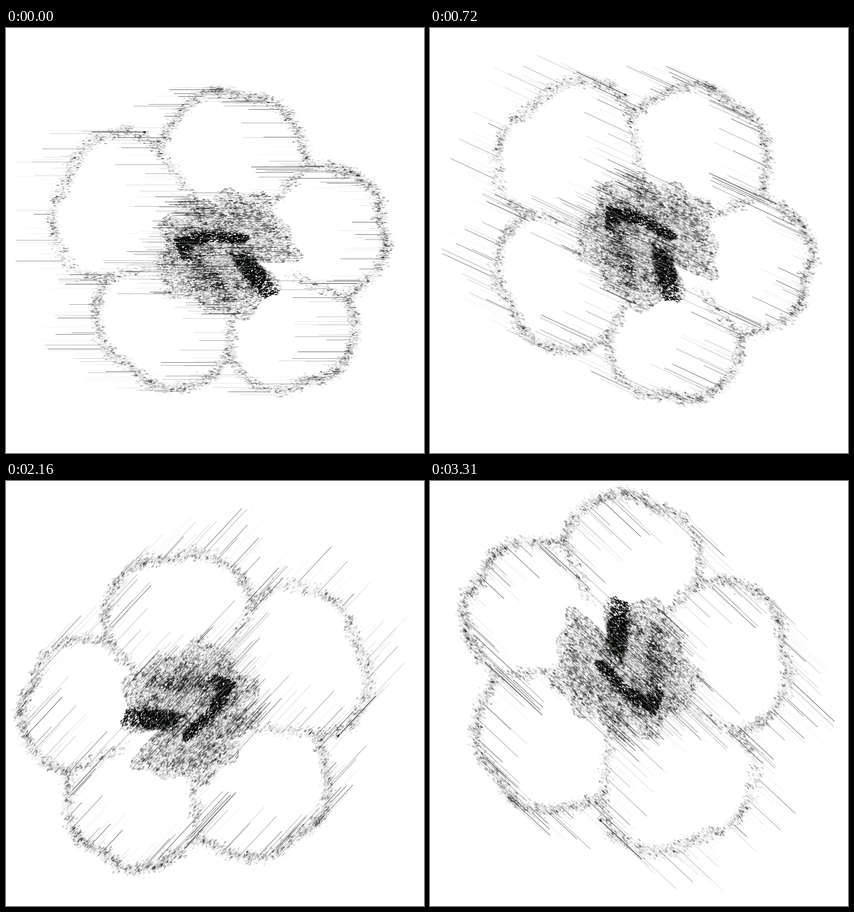
Animation, 742 px wide and 754 px high, one loop 3600 ms. Source, as an HTML page with a canvas:

```html
<!DOCTYPE html>
<html lang="en">
<head>
<meta charset="utf-8">
<title>Streaked flower</title>
<style>
  html, body { margin: 0; width: 100%; height: 100%; overflow: hidden; background: #fff; }
  canvas { display: block; }
</style>
</head>
<body>
<canvas id="stage" width="742" height="754"></canvas>
<script>
const ctx = document.getElementById('stage').getContext('2d');
const HOLD = 720;
const INK = '#080b08';
const LEFT_LIMIT = 17;
const PIVOT = { x: 396, y: 390 };
const HEART = { x: 390, y: 397 };

// Where the pivot lands, the turn in degrees and the scale of each step.
const POSES = [
  { x: 396, y: 390, turn: 0, scale: 1 },
  { x: 397, y: 373, turn: 25, scale: 1.02 },
  { x: 384, y: 425, turn: 95, scale: 1.04 },
  { x: 327, y: 421, turn: 133, scale: 1.04 },
  { x: 335, y: 332, turn: 223, scale: 1.07 }
];

// Points where neighbouring petals meet; bulge shapes the petal that follows.
const JOINTS = [
  { x: 268, y: 215, bulge: -0.07 },
  { x: 532, y: 244, bulge: -0.08 },
  { x: 600, y: 478, bulge: 0.08 },
  { x: 396, y: 570, bulge: 0.07 },
  { x: 185, y: 441, bulge: 0.22 }
];

// Dark strokes in the heart.
const STROKES = [
  { x1: 310, y1: 381, x2: 350, y2: 371, width: 11, dark: 1.5 },
  { x1: 318, y1: 385, x2: 318, y2: 398, width: 11, dark: 1.5 },
  { x1: 350, y1: 370, x2: 420, y2: 372, width: 8, dark: 1.4 },
  { x1: 422, y1: 412, x2: 466, y2: 470, width: 15, dark: 1.2 },
  { x1: 335, y1: 410, x2: 376, y2: 456, width: 14, dark: 0.4 }
];

let seed = 20417;
function rnd() {
  seed = (seed + 0x6D2B79F5) | 0;
  let t = Math.imul(seed ^ (seed >>> 15), 1 | seed);
  t = (t + Math.imul(t ^ (t >>> 7), 61 | t)) ^ t;
  return ((t ^ (t >>> 14)) >>> 0) / 4294967296;
}
const bell = () => rnd() + rnd() + rnd() - 1.5;
const clamp = (v, lo, hi) => Math.min(hi, Math.max(lo, v));
const mix = (a, b, t) => a + (b - a) * t;

function hash(x, y) {
  const s = Math.sin(x * 127.1 + y * 311.7) * 43758.5453;
  return s - Math.floor(s);
}
function noise(x, y, size) {
  const u = x / size, v = y / size, i = Math.floor(u), j = Math.floor(v);
  return mix(
    mix(hash(i, j), hash(i + 1, j), u - i),
    mix(hash(i, j + 1), hash(i + 1, j + 1), u - i), v - j);
}

const under = [], over = [];
function dab(list, x, y, w, h, alpha, color = INK) {
  list.push({ x: Math.round(x), y: Math.round(y), w, h, alpha, color });
}
function streak(x, y, length, alpha, color) {
  const from = Math.max(LEFT_LIMIT, x - length);
  dab(over, from, y, x - from, 1, alpha, color);
}

function edge(x, y, density) {
  const count = density * (0.4 + 1.2 * noise(x, y, 25));
  for (let i = 0; i < count; i++) {
    const px = x + bell() * 11, py = y + bell() * 11;
    const clump = noise(px, py, 5) ** 1.6 * (0.4 + 0.6 * hash(3, Math.round(py)));
    dab(under, px, py, 2 + Math.floor(rnd() * 4), rnd() < 0.4 ? 2 : 1, 0.03 + 0.75 * clump * rnd());
  }
  if (rnd() < 0.12) {
    streak(x + bell() * 8, y + bell() * 12, 20 + 85 * rnd(), 0.04 + 0.55 * rnd() ** 3);
  }
}

// A half circle over the chord between two joints, dented at its tip.
function petal(a, b) {
  const radius = Math.hypot(b.x - a.x, b.y - a.y) / 2;
  const first = Math.atan2(a.y - b.y, a.x - b.x);
  const steps = Math.round(radius * Math.PI);
  for (let s = 0; s < steps; s++) {
    const t = s / steps;
    const swell = a.bulge * Math.min(1, 2.5 * Math.sin(Math.PI * t));
    const dent = 0.12 * Math.exp(-(((t - 0.53) / 0.09) ** 2));
    const r = radius * (1 + swell - dent);
    const angle = first + Math.PI * t;
    edge((a.x + b.x) / 2 + r * Math.cos(angle), (a.y + b.y) / 2 + r * Math.sin(angle), 4.6);
  }
}

function spur(joint) {
  for (let t = 0; t < 0.5; t += 0.005) {
    edge(mix(joint.x, PIVOT.x, t), mix(joint.y, PIVOT.y, t), 3 - 3 * t);
  }
}

function heartPoint() {
  const a = rnd() * Math.PI * 2, k = Math.sqrt(rnd());
  const notch = 62 * Math.exp(-(((a - 0.33) / 0.15) ** 2));
  const r = k * (118 + 8 * Math.sin(a * 5 + 1) + 7 * Math.sin(a * 11) - notch);
  return { x: HEART.x + 1.06 * r * Math.cos(a), y: HEART.y + 0.94 * r * Math.sin(a), k };
}

function strokeInk(x, y) {
  let ink = 0;
  for (const { x1, y1, x2, y2, width, dark } of STROKES) {
    const dx = x2 - x1, dy = y2 - y1;
    const t = clamp(((x - x1) * dx + (y - y1) * dy) / (dx * dx + dy * dy), 0, 1);
    const d = Math.hypot(x - x1 - t * dx, y - y1 - t * dy) / width;
    ink = Math.max(ink, dark * Math.exp(-(d ** 4)));
  }
  return ink;
}

function heart() {
  for (let i = 0; i < 17000; i++) {
    const { x, y, k } = heartPoint();
    if (rnd() < (k - 0.65) * 1.8) continue;
    const tone = noise(x, y, 24) * 0.22 + noise(x, y, 5) ** 2 * 0.5;
    const alpha = clamp(tone * (0.35 + 0.65 * rnd()) + strokeInk(x, y) * 0.7, 0.02, 0.95);
    dab(under, x - 8 * rnd() ** 4, y, 2 + Math.floor(rnd() * 4), rnd() < 0.6 ? 2 : 1, alpha);
  }
  for (let i = 0; i < 700; i++) {
    const { x, y } = heartPoint();
    dab(over, x, y, 1 + Math.floor(rnd() * 4), 1 + Math.round(rnd()), 0.2 + 0.4 * rnd(), '#fff');
  }
  for (let i = 0; i < 230; i++) {
    const { x, y } = heartPoint();
    streak(x, y, 20 + 70 * rnd(), 0.05 + 0.6 * rnd() ** 2.5);
    if (i % 3 === 0) streak(x + 30, y + 5, 15 + 40 * rnd(), 0.2 + 0.5 * rnd(), '#fff');
  }
}

JOINTS.forEach((joint, i) => {
  petal(joint, JOINTS[(i + 1) % JOINTS.length]);
  spur(joint);
});
heart();
dab(over, 244, 183, 4, 3, 0.8);
streak(246, 184, 94, 0.85);

function paint(list) {
  for (const m of list) {
    ctx.globalAlpha = m.alpha;
    ctx.fillStyle = m.color;
    ctx.fillRect(m.x, m.y, m.w, m.h);
  }
}

function draw({ x, y, turn, scale }) {
  ctx.resetTransform();
  ctx.globalAlpha = 1;
  ctx.fillStyle = '#fff';
  ctx.fillRect(0, 0, 742, 754);
  ctx.translate(x, y);
  ctx.rotate(turn * Math.PI / 180);
  ctx.scale(scale, scale);
  ctx.translate(-PIVOT.x, -PIVOT.y);
  paint(under);
  paint(over);
}

let shown = -1;
const start = performance.now();
function tick() {
  const step = Math.floor((performance.now() - start) / HOLD) % POSES.length;
  if (step !== shown) draw(POSES[shown = step]);
  requestAnimationFrame(tick);
}
tick();
</script>
</body>
</html>
```
